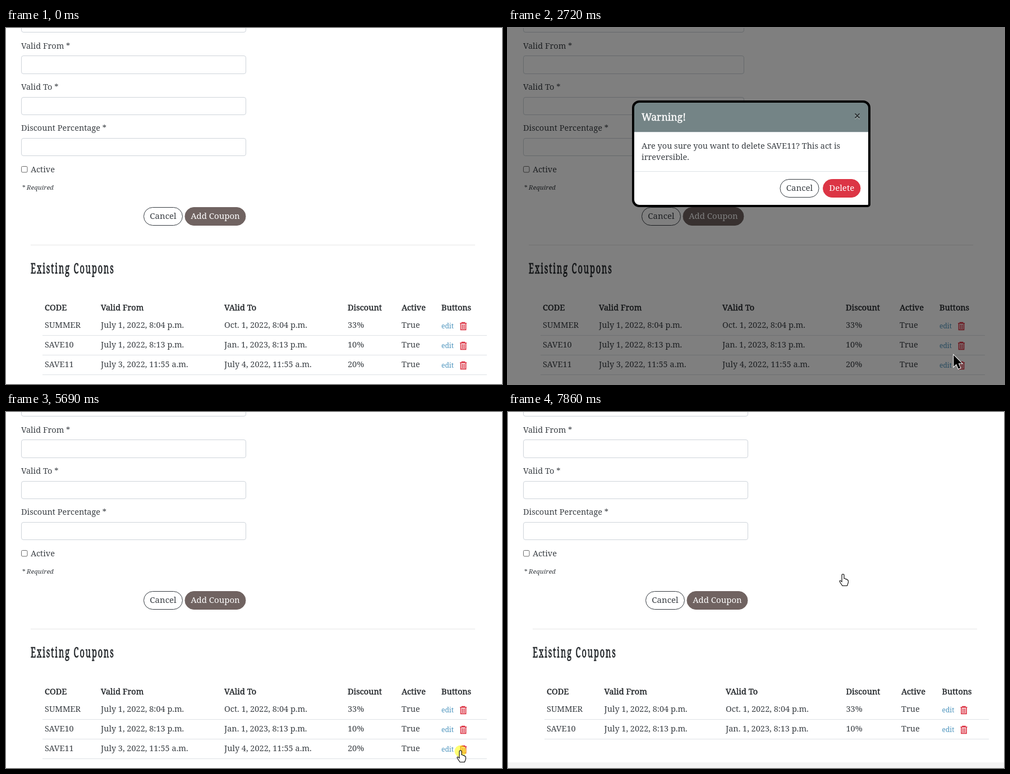
Write an HTML page that moves like this. It is 884 by 634 pixels and loops after 8 s.

```html
<!DOCTYPE html>
<html lang="en">
<head>
<meta charset="utf-8">
<title>Coupon admin</title>
<style>
  html, body { margin: 0; width: 100%; height: 100%; overflow: hidden; background: #fff; }
  svg { display: block; }
  text { font: 14.5px "Noto Serif", serif; fill: #3a3f44; white-space: pre; }
  .strong { fill: #212529; stroke: #212529; stroke-width: .4px; }
  .small { font-size: 12px; fill: #4e95be; }
  .note { font-size: 11.6px; font-style: italic; }
  .mid { font-size: 15px; text-anchor: middle; }
  .light { fill: #fff; }
  .title { font-size: 17.6px; fill: #fff; stroke: #fff; stroke-width: .4px; }
  .display { font-size: 26px; letter-spacing: 3.4px; fill: #212529; stroke: #212529;
    stroke-width: .7px; vector-effect: non-scaling-stroke; }
  .line { stroke: #dee2e6; }
  .field { fill: none; stroke: #ced4da; }
</style>
</head>
<body>
<svg id="stage" width="884" height="634" viewBox="0 0 884 634"></svg>
<script>
const LOOP = 8000;
const label = (x, y, str, cls = '') => `<text x="${x}" y="${y}" class="${cls}">${str}</text>`;
const box = (x, y, w, h, r, attrs) =>
  `<rect x="${x}" y="${y}" width="${w}" height="${h}" rx="${r}" ${attrs}/>`;
const rule = (x, y, w) => `<path class="line" d="M${x} ${y}h${w}"/>`;
const pill = (x, y, w, str, fill, stroke, cls) =>
  box(x + .5, y + .5, w - 1, 32, 16, `fill="${fill}" stroke="${stroke}"`) +
  label(x + w / 2, y + 21, str, 'mid ' + cls);
const bin = (x, y) => `<g transform="translate(${x} ${y})" fill="none" stroke="#dc3545" stroke-width="1.7">
  <path d="M-6 -5h12M-2.5 -5.2v-1.3h5v1.3M-4.5 -5v11.3h9v-11.3M-1.5 -3v8M1.5 -3v8"/></g>`;

const heads = ['CODE', 'Valid From', 'VAlid To', 'Discount', 'Active', 'Buttons'];
const coupons = [
  ['SUMMER', 'July 1, 2022, 8:04 p.m.', 'Oct. 1, 2022, 8:04 p.m.', '33%', 'True'],
  ['SAVE10', 'July 1, 2022, 8:13 p.m.', 'Jan. 1, 2023, 8:13 p.m.', '10%', 'True'],
  ['SAVE11', 'July 3, 2022, 11:55 a.m.', 'July 4, 2022, 11:55 a.m.', '20%', 'True']
];

// shift: how far the layout moves left while the scrollbar is hidden
function page(id, shift, cols, rows) {
  const fields = ['', 'Valid From *', 'Valid To *', 'Discount Percentage *'].map((name, i) => {
    const y = 73.3 * i - 24;
    const top = Math.round(y), bottom = Math.round(y + 32.3);
    return label(27, Math.round(y - 12.5), name) +
      box(27.5, top + .5, 400 - shift, bottom - top - 1, 3.5, 'class="field"');
  }).join('');
  const table = rows.map((row, i) => {
    const y = 534 + 35 * i;
    return row.map((cell, c) => label(cols[c], y, cell)).join('') +
      label(cols[5], y + 1, 'edit', 'small') + bin(cols[5] + 39, y - 3) + rule(65, y + 13.5, 792);
  }).join('');
  return `<g id="${id}">${fields}
    ${box(27.5, 246.5, 10.5, 10.5, 2, 'fill="#fff" stroke="#6b6b6b"')}
    ${label(44, 257, 'Active')}${label(28, 288, '* Required', 'note')}
    <g transform="translate(${-shift} 0)">
      ${pill(245, 319, 70, 'Cancel', '#fff', '#343a40', '')}
      ${pill(318.5, 319, 109, 'Add Coupon', '#706361', '#706361', 'light')}
      <path d="M44 386.5h792" stroke="#e5e5e5"/>
      <g transform="translate(44 437) scale(.56 1)">${label(0, 0, 'Existing Coupons', 'display')}</g>
      ${heads.map((h, c) => label(cols[c], 503, h, 'strong')).join('')}${table}
    </g></g>`;
}

const wide = [69, 169, 389, 609, 705, 776];
const narrow = [69, 171.5, 388, 602.5, 701, 773.5];
const frame = 'M234 131H633a11 11 0 0 1 11 11V314a3 3 0 0 1-3 3H234a11 11 0 0 1-11-11V142a11 11 0 0 1 11-11z';

document.getElementById('stage').innerHTML = `
  <rect width="884" height="634" fill="#fff"/>
  ${page('before', 0, wide, coupons)}
  ${page('locked', 7, wide, coupons)}
  ${page('after', 0, narrow, coupons.slice(0, 2))}
  <rect id="footer" y="624" width="884" height="10" fill="#f4f4f4"/>
  <rect id="backdrop" width="884" height="634"/>
  <g id="modal">
    <path d="${frame}" fill="#fff"/>
    <rect x="225" y="133" width="417" height="52" fill="#748486"/>
    ${rule(225, 185.5, 417)}${rule(225, 255.5, 417)}
    <path d="${frame}" fill="none" stroke="#000" stroke-width="4"/>
    ${label(238, 165, 'Warning!', 'title')}
    <path d="M618.5 154l8 8m0-8l-8 8" stroke="#fff" stroke-width="1.6" opacity=".5"/>
    <path d="M618.5 152.5l8 8m0-8l-8 8" stroke="#2c3233" stroke-width="1.8"/>
    ${label(238, 215, 'Are you sure you want to delete SAVE11? This act is')}
    ${label(238, 235, 'irreversible.')}
    ${pill(484.5, 269, 70, 'Cancel', '#fff', '#343a40', '')}
    <g id="cancelHover">${pill(484.5, 269, 70, 'Cancel', '#343a40', '#343a40', 'light')}</g>
    <rect id="ring" x="559.5" y="267.5" width="70.5" height="35.5" rx="17.7" fill="none" stroke="#e15361" stroke-opacity=".5" stroke-width="3"/>
    ${pill(561, 269, 67.5, 'Delete', '#dc3545', '#dc3545', 'light')}
    <g id="deleteHover">${pill(561, 269, 67.5, 'Delete', '#c82333', '#bd2130', 'light')}</g>
  </g>
  <g id="cursor">
    <circle id="click" r="10.5" fill="#ff0" opacity=".55"/>
    <path id="arrow" d="M0 0V20.5L4.8 16L8.4 24.3L12 22.8L8.4 14.8H14.6Z" stroke="#fff" stroke-width="2" paint-order="stroke"/>
    <path id="hand" d="M-2 1q0-2.3 2-2.3t2 2.3V6.5q2.6-.3 2.8 1.2q2.4-.4 2.6 1.2q2-.1 2 2V14L7.4 19.5H-1L-5.8 12.2q-.6-2.2 1.2-2l2.6 2.2z" fill="#fff" stroke="#000" stroke-width="1.1"/>
  </g>`;

// cursor path: time, x, y
const track = [
  [400, 728, 640], [600, 735, 615], [850, 775, 575], [1050, 825, 550], [1150, 837, 553],
  [1300, 790, 536], [1400, 763, 533], [1500, 795, 575], [1570, 813, 600],
  [2660, 813, 600], [2800, 770, 560], [3000, 660, 440], [3200, 570, 345], [3430, 524, 301], [3640, 525, 289],
  [4590, 525, 289], [4750, 560, 330], [4950, 670, 455], [5150, 770, 565], [5360, 810, 604],
  [6150, 810, 604], [6300, 750, 560], [6430, 668, 478], [6500, 626, 412], [6650, 598, 325],
  [6800, 592, 297], [6990, 597, 290], [LOOP, 597, 290]
];
const hands = [[1540, 1985], [3470, 4100], [5300, 5768], [6640, LOOP]];
const clicks = [1910, 3910, 5690, 7320];
const OPEN = [1988, 5768], CLOSE = 3945, RELOAD = 7860;

const ramp = (t, start, length) => Math.min(1, Math.max(0, (t - start) / length));
const easeOut = p => 1 - (1 - p) ** 2;

function cursorAt(t) {
  const i = Math.max(1, track.findIndex(p => p[0] > t));
  const [t0, x0, y0] = track[i - 1], [t1, x1, y1] = track[i];
  const p = ramp(t, t0, t1 - t0);
  return [x0 + (x1 - x0) * p, y0 + (y1 - y0) * p];
}

const el = id => document.getElementById(id);
const fade = (id, value) => el(id).setAttribute('opacity', value);
const show = (id, on) => { el(id).style.display = on ? '' : 'none'; };

function draw(t) {
  const reloaded = t >= RELOAD;
  const first = t < 4500;
  const opened = OPEN[first ? 0 : 1];
  const closing = first ? CLOSE : Infinity;
  const locked = !reloaded && t >= opened && t < closing + 345;
  show('before', !reloaded && !locked);
  show('locked', locked);
  show('after', reloaded);
  show('footer', reloaded);

  show('backdrop', locked);
  fade('backdrop', .5 * (ramp(t, opened, 150) - ramp(t, closing + 180, 150)));
  show('modal', locked);
  fade('modal', ramp(t, opened + 160, 150) - ramp(t, closing, 150));
  const drop = easeOut(ramp(t, opened + 160, 300)) - easeOut(ramp(t, closing, 300));
  el('modal').setAttribute('transform', `translate(0 ${45 * (drop - 1)})`);
  fade('cancelHover', first ? ramp(t, 3470, 150) : 0);
  fade('deleteHover', ramp(t, 6640, 150));
  fade('ring', ramp(t, 7320, 120));

  const hand = hands.some(([a, b]) => t >= a && t < b);
  show('cursor', t >= 400);
  show('hand', hand);
  show('arrow', !hand);
  show('click', clicks.some(c => t >= c && t < c + 140));
  el('cursor').setAttribute('transform', `translate(${cursorAt(t)})`);
}

function tick() {
  draw(performance.now() % LOOP);
  requestAnimationFrame(tick);
}
tick();
</script>
</body>
</html>
```
